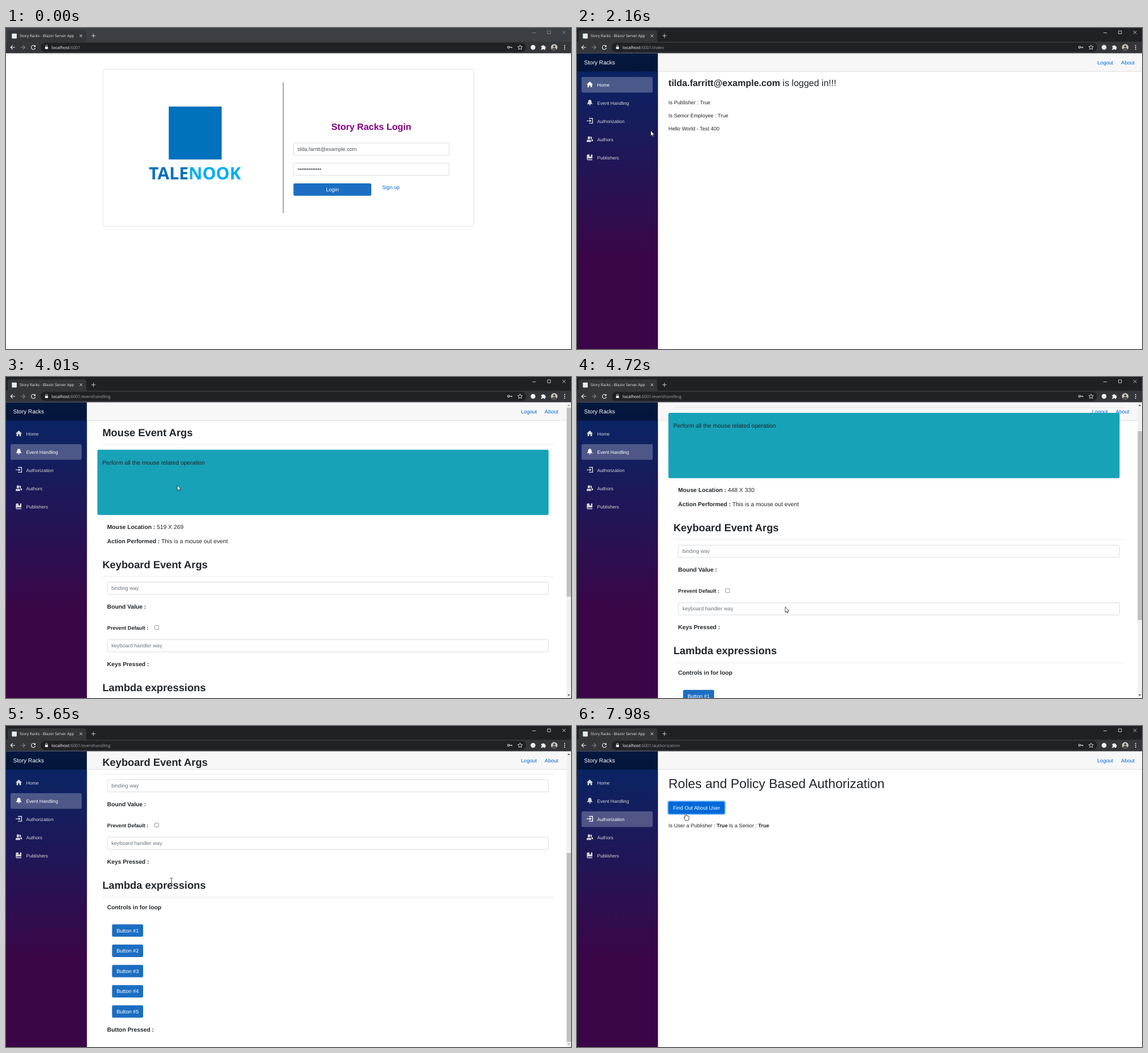
An HTML page for the animation above (8 s loop, 993x564 px).

```html
<!DOCTYPE html>
<html lang="en">
<head>
<meta charset="utf-8">
<title>Story Racks</title>
<style>
html, body { margin: 0; width: 100%; height: 100%; overflow: hidden; background: #fff; }
svg { display: block; width: 993px; height: 564px; }
text { font-family: "Liberation Sans", Arial, sans-serif; white-space: pre; text-rendering: geometricPrecision; }
.ui { font-family: "Open Sans", "Noto Sans", sans-serif; }
.b { font-weight: 700; }
</style>
</head>
<body>
<svg id="stage" viewBox="0 0 993 564" xmlns="http://www.w3.org/2000/svg"></svg>
<script>
const LOOP = 8000;
const INK = '#212529', LINK = '#0366d6', BLUE = '#1b6ec2', HOVER = '#0069d9';
const BRAND = 'Story Racks', USER = 'tilda.farritt@example.com';
const $ = id => document.getElementById(id);

const text = (x, y, size, str, fill = INK, extra = '') =>
  `<text x="${x}" y="${y}" font-size="${size}" fill="${fill}" ${extra}>${str}</text>`;
const bold = (x, y, size, str) => text(x, y, size, str, INK, 'class="b"');
const ui = (x, y, size, str, fill, extra = '') => text(x, y, size, str, fill, `class="ui" ${extra}`);
const mid = (x, y, size, str, fill, extra = '') => text(x, y, size, str, fill, `text-anchor="middle" ${extra}`);
const rect = (x, y, w, h, fill, r = 0, extra = '') =>
  `<rect x="${x}" y="${y}" width="${w}" height="${h}" rx="${r}" fill="${fill}" ${extra}/>`;
const path = (d, fill, extra = '') => `<path d="${d}" fill="${fill}" ${extra}/>`;
const line = (d, color, w = 1, extra = '') => path(d, 'none', `stroke="${color}" stroke-width="${w}" ${extra}`);
const dot = (x, y, r, fill, extra = '') => `<circle cx="${x}" cy="${y}" r="${r}" fill="${fill}" ${extra}/>`;
const input = (x, y, w) => rect(x, y, w, 21.4, '#fff', 2.3, 'stroke="#ced4da" stroke-width=".8"');
const button = (x, y, w, label, id = '') =>
  rect(x, y, w, 21.8, BLUE, 2.3, id && `id="${id}" stroke="#268fff" stroke-opacity=".5" stroke-width="0" paint-order="stroke"`) +
  mid(x + w / 2, y + 14.1, 9.14, label, '#fff');

function chrome() {
  const W = '#f1f3f4', G = '#d5d7da';
  return rect(0, 0, 993, 24, '#202124', 0, 'id="strip"') +
    path('M0 24Q3 24 3 21V8Q3 4 7 4H137Q141 4 141 8V21Q141 24 144 24Z', '#35363a') +
    rect(10.3, 9.8, 8.6, 8.6, '#e4edf2', .8) +
    ui(24, 16.3, 6.62, BRAND + ' - Blazor Server App', '#e8eaed') +
    line('M129.5 11.5l4.4 4.4m0-4.4l-4.4 4.4', W, .9) +
    line('M150 13.7h7.4m-3.7-3.7v7.4', G, .9) +
    `<g id="winBtns">${line('M925 8.5h6.4M951.8 5h5.2v5.2h-5.2zM977.8 4.9l5.6 5.6m0-5.6l-5.6 5.6', '#e8eaed', .8)}</g>` +
    rect(0, 24, 993, 20.4, '#35363a') +
    line('M15.7 34H8.3m3.5-3.6L8.2 34l3.6 3.6', W, 1.1) +
    line('M25.8 34h7.4m-3.5-3.6l3.6 3.6-3.6 3.6', '#84878b', 1.1) +
    line('M50.6 31.6a3.6 3.6 0 1 0 .9 3.4', W, 1.1) + path('M51.9 29.7v3.6h-3.6z', W) +
    rect(61, 26, 853, 16, '#202124', 8) +
    rect(68.7, 33, 5, 4, W, .6) + line('M69.8 33v-1.4a1.4 1.4 0 0 1 2.8 0V33', W, .8) +
    `<text x="80" y="36.7" font-size="7.55" class="ui" fill="#9aa0a6"><tspan fill="#fff">localhost</tspan>:6001/<tspan id="route"></tspan></text>` +
    line('M885 33.7h4.2v1.8m-1.7-1.8v1.3', G, 1) + dot(883.2, 33.7, 1.7, 'none', `stroke="${G}" stroke-width="1.1"`) +
    line('M903.5 29.8l1.2 2.8 3 .2-2.3 2 .7 3-2.6-1.6-2.6 1.6.7-3-2.3-2 3-.2z', W, .8) +
    dot(926.3, 34, 4.2, W) +
    path('M940.5 31.5h2.2a1.3 1.3 0 1 1 2.6 0h2.2v2.2a1.3 1.3 0 1 1 0 2.6v2h-2.2a1.3 1.3 0 0 0-2.6 0h-2.2v-2.1a1.3 1.3 0 0 0 0-2.6z', W) +
    dot(963.5, 34, 5.8, '#c9c4bd') + dot(963.5, 32.4, 2, '#4b4744') + path('M959.5 38.2q0-3.2 4-3.2t4 3.2q-4 2.6-8 0z', '#4b4744') +
    [30.8, 34, 37.2].map(y => dot(981.8, y, .95, W)).join('');
}

const navIcons = [
  path('M5.5 0L0 5.2h1.6V10h2.7V6.8h2.4V10h2.7V5.2H11z', 'currentColor'),
  path('M5.5 0C3.4 0 2.6 1.8 2.5 3.6 2.4 5.6 1.4 6.6.2 7.6h10.6C9.6 6.6 8.6 5.6 8.5 3.6 8.4 1.8 7.6 0 5.5 0zM4 8.5a1.5 1.5 0 0 0 3 0z', 'currentColor'),
  line('M4 .7h6.3v8.6H4', 'currentColor', 1.4) + path('M5.2 2.4L8.4 5 5.2 7.6V5.7H0V4.3h5.2z', 'currentColor'),
  `<g fill="currentColor"><ellipse cx="3.9" cy="2.9" rx="2.1" ry="2.7"/><path d="M0 10V7.8Q0 6.4 1.8 6q2.1 1.2 4.2 0 1.8.4 1.8 1.8V10zM6.4.8a2 2.4 0 1 1 .5 4.5Q7.3 3 6.4.8zM8.7 8.8V7.4q0-.8-.8-1.5l1.9-.5q1.4.4 1.4 1.6v1.8z"/></g>`,
  path('M1.4 0H5v4l1.3-1.2L7.6 4V0H10v7H2q-.8.1-.8.8t.8.7h8V10H1.6Q.3 9.8.3 8.4v-7Q.3.2 1.4 0z', 'currentColor')
];
const navLabels = ['Home', 'Event Handling', 'Authorization', 'Authors', 'Publishers'];
const navY = i => 86 + i * 32.05;

function sidebar() {
  return rect(0, 44.4, 142.3, 520, 'url(#night)') + rect(0, 44.4, 142.3, 32.2, '#000', 0, 'opacity=".4"') +
    text(12.5, 64.2, 10.1, BRAND, '#fff') +
    navLabels.map((s, i) => rect(8, navY(i), 125, 27.4, '#fff', 2.3, `id="nav${i}"`) +
      `<g id="item${i}"><g transform="translate(17 ${navY(i) + 8})">${navIcons[i]}</g>` +
      text(35.5, navY(i) + 16.9, 8.23, s, 'currentColor') + '</g>').join('');
}

function topbar() {
  return rect(142.3, 44.4, 851, 32.2, '#f7f7f7') + line('M142.3 76.3H993', '#d6d5d5', .7) +
    `<g id="links">${text(914.5, 63.7, 9.14, 'Logout', LINK)}${text(956.3, 63.7, 9.14, 'About', LINK)}</g>`;
}

function login() {
  return rect(170.5, 72.5, 652, 276, '#fff', 2.3, 'stroke="#dfdfdf" stroke-width=".8"') +
    line('M487.2 96v229', '#555', 1) +
    rect(286, 138, 93, 93, '#0071bc') +
    `<text x="332" y="265.7" font-size="30" text-anchor="middle" class="ui b" fill="#0071bc">TALE<tspan fill="#00aeef">NOOK</tspan></text>` +
    mid(642, 179.4, 16, BRAND + ' Login', '#800080', 'class="b"') +
    input(505.4, 202.2, 273.4) + text(512.6, 215.7, 9.14, USER, '#495057') +
    input(505.4, 237.4, 273.4) + text(512.6, 250.8, 9.14, '•'.repeat(13), '#495057') +
    button(505.2, 272.9, 136.8, 'Login', 'loginBtn') + text(661, 282.7, 9.14, 'Sign up', LINK);
}

function home() {
  return `<text x="160.8" y="102.3" font-size="16" fill="${INK}"><tspan class="b">${USER}</tspan> is logged in!!!</text>` +
    ['Is Publisher : True', 'Is Senior Employee : True', 'Hello World - Test 400']
      .map((s, i) => text(160.8, 134.1 + i * 22.9, 9.14, s)).join('');
}

function events() {
  const head = (y, s) => bold(169.4, y, 18.28, s) + line(`M169.4 ${y + 14.5}H962`, '#000', .7, 'stroke-opacity=".12"');
  const field = (y, s) => input(178, y, 775.4) + text(185.2, y + 13.7, 9.14, s, '#6c757d');
  const pair = (y, s, id) => `<text x="177.8" y="${y}" font-size="10.28" fill="${INK}"><tspan class="b">${s} :</tspan> <tspan id="${id}"></tspan></text>`;
  return head(104, 'Mouse Event Args') +
    rect(160.6, 127.8, 793, 114.6, '#17a2b8', 2.3) +
    text(169.2, 154, 10.28, 'Perform all the mouse related operation') +
    pair(267, 'Mouse Location', 'spot') + pair(291.7, 'Action Performed', 'action') +
    head(336, 'Keyboard Event Args') + field(360.3, 'binding way') +
    bold(177.8, 406.6, 10.28, 'Bound Value :') + bold(177.8, 443.6, 9.14, 'Prevent Default :') +
    rect(261.4, 436.6, 6.8, 6.8, '#fff', 1, 'stroke="#767676" stroke-width=".8"') +
    field(461.4, 'keyboard handler way') + bold(177.8, 508, 10.28, 'Keys Pressed :') +
    head(552.2, 'Lambda expressions') + bold(177.8, 587.5, 10.28, 'Controls in for loop') +
    [1, 2, 3, 4, 5].map(n => button(186.4, 579 + n * 35.55, 54.6, 'Button #' + n)).join('') +
    bold(177.8, 803.2, 10.28, 'Button Pressed :');
}

function auth() {
  return text(160.8, 108.6, 22.85, 'Roles and Policy Based Authorization') +
    button(160.5, 132.7, 99, 'Find Out About User', 'findBtn') +
    `<text x="160.8" y="178.2" font-size="9.14" fill="${INK}">Is User a Publisher : <tspan class="b" id="pub"></tspan> Is a Senior : <tspan class="b" id="senior"></tspan></text>`;
}

$('stage').innerHTML =
  `<defs><linearGradient id="night" x1="0" y1="0" x2="0" y2="1"><stop offset="0" stop-color="#052767"/><stop offset=".7" stop-color="#3a0647"/></linearGradient>
  <clipPath id="view"><rect x="142" y="44.4" width="843" height="520"/></clipPath></defs>` +
  rect(0, 0, 993, 564, '#fff') +
  `<g id="login">${login()}</g><g id="app">${sidebar()}${topbar()}</g><g id="home">${home()}</g>
  <g id="events"><g clip-path="url(#view)"><g id="scroll">${events()}</g></g>
  ${rect(985, 44.4, 8, 520, '#f1f1f1')}${rect(985.4, 54, 7.6, 332, '#c1c1c1', 0, 'id="thumb"')}
  ${path('M986.8 51l2.3-2.8 2.3 2.8z', '#505050', 'id="up"')}${path('M986.8 557.8l2.3 2.8 2.3-2.8z', '#505050', 'id="down"')}</g>
  <g id="auth">${auth()}</g>` + chrome() +
  `<g id="status">${rect(-3, 553, 120, 14, '#35363a', 2)}${ui(1.7, 561.2, 6.5, '', '#bdc1c6', 'id="url"')}</g>
  <g id="cursor" stroke="#111" stroke-width=".75" stroke-linejoin="round">
  ${path('M0 0V9.6L2.2 7.6 3.6 10.9 5.2 10.2 3.8 7H6.8Z', '#fff', 'id="arrow"')}
  ${path('M-1.1 .9C-1.1-.3 .9-.3 .9 .9V4.6C1.1 3.9 2.7 4 2.7 5.1 3 4.5 4.3 4.6 4.3 5.6 4.7 5.1 5.9 5.3 5.9 6.3V9C5.9 10.6 5 11.4 4.8 13H-.6C-.9 11.2-2.9 9.4-3.2 7.6-3.3 6.6-2 6.3-1.1 7.6Z', '#fff', 'id="hand"')}
  ${path('M-2.4-4.7Q-.3-4.7 0-4 .3-4.7 2.4-4.7M0-4V4M-2.4 4.7Q-.3 4.7 0 4 .3 4.7 2.4 4.7', 'none', 'id="beam"')}</g>`;

// Bursts of screen updates: first, last, count
const bursts = [[130, 770, 9], [1070, 1160, 2], [1620, 2390, 11], [2470, 2470, 1], [2620, 2780, 3],
  [2940, 3720, 11], [3770, 4550, 11], [4630, 5190, 8], [5410, 6110, 10], [6260, 6340, 2],
  [6490, 7120, 9], [7500, 7730, 4], [7980, 7980, 1]];
// Pointer path: time, x, y
const moves = [[130, 962, 543], [290, 880, 470], [530, 690, 335], [690, 622, 296], [770, 613, 292],
  [1620, 604, 290], [1850, 400, 245], [2080, 170, 195], [2240, 88, 165], [2390, 80, 148], [2470, 80, 146.5],
  [2620, 80, 143], [2780, 80, 138.5], [3330, 80, 138.5], [3720, 140, 146], [3770, 160, 150], [4004, 301, 190],
  [4160, 264, 226], [4238, 256, 246], [4394, 310, 340], [4550, 366, 404], [5360, 366, 404],
  [5643, 291, 272], [5880, 130, 185], [6110, 79, 162], [6420, 79, 162], [6800, 135, 160], [7120, 200, 149],
  [7970, 200, 149], [7980, 191, 153]];
const scrolls = [[4590, 0], [4870, 151], [5030, 220], [5190, 266]];

function snap(t) {
  let s = 0;
  for (const [a, b, n] of bursts) {
    if (t < a) break;
    const step = n > 1 ? (b - a) / (n - 1) : 1;
    s = a + step * Math.min(n - 1, Math.floor((t - a) / step + .01));
  }
  return s;
}

function along(keys, t, col = 1) {
  if (t <= keys[0][0]) return keys[0][col];
  for (let i = 1; i < keys.length; i++) {
    const p = keys[i - 1], q = keys[i];
    if (t < q[0]) return p[col] + (q[col] - p[col]) * (t - p[0]) / (q[0] - p[0]);
  }
  return keys[keys.length - 1][col];
}

const set = (id, name, v) => $(id).setAttribute(name, v);
const show = (id, on) => set(id, 'display', on ? 'inline' : 'none');
const write = (id, s) => { if ($(id).textContent !== s) $(id).textContent = s; };
const inside = (x, y, l, t, w, h) => x >= l && x < l + w && y >= t && y < t + h;

function draw(now) {
  const t = snap(now % LOOP);
  const page = t < 1150 ? 'login' : t < 3010 ? 'home' : t < 6330 ? 'events' : 'auth';
  const x = along(moves, t), y = along(moves, t, 2);
  for (const p of ['login', 'home', 'events', 'auth']) show(p, p === page);
  show('app', page !== 'login');
  write('route', { login: '', home: 'index', events: 'eventhandling', auth: 'authorization' }[page]);
  // the address has no trailing slash on the first page
  const slash = $('route').previousSibling;
  slash.data = page === 'login' ? ':6001' : ':6001/';

  const focused = t >= 1060;
  set('strip', 'fill', focused ? '#202124' : '#3c3f43');
  set('winBtns', 'opacity', focused ? 1 : .5);

  const active = ['home', 'events', 'auth'].indexOf(page);
  let over = false;
  navLabels.forEach((_, i) => {
    const hot = page !== 'login' && inside(x, y, 8, navY(i), 125, 27.4);
    over = over || hot;
    set('nav' + i, 'opacity', i === active ? .25 : hot ? .1 : 0);
    set('item' + i, 'color', i === active || hot ? '#fff' : '#d7d7d7');
  });

  const onLogin = page === 'login' && inside(x, y, 505, 273, 137, 22);
  const onFind = page === 'auth' && inside(x, y, 160, 132, 100, 23);
  set('loginBtn', 'fill', onLogin ? HOVER : BLUE);
  set('loginBtn', 'stroke-width', focused ? 3.6 : 0);
  set('findBtn', 'fill', onFind ? HOVER : BLUE);
  set('findBtn', 'stroke-width', 3.6 * Math.max(0, Math.min(1, (t - 7450) / 150)));

  const known = t > 7570 ? 'True' : 'False';
  write('pub', known);
  write('senior', known);
  const left = t > 4230;
  write('spot', left ? '448 X 330' : t > 3900 ? '519 X 269' : '');
  write('action', t > 3900 ? 'This is a mouse out event' : '');

  const s = along(scrolls, t);
  set('scroll', 'transform', `translate(0 ${-s})`);
  set('thumb', 'y', 54 + s * 169 / 266);
  set('up', 'fill', s > 0 ? '#505050' : '#a3a3a3');
  set('down', 'fill', s < 266 ? '#505050' : '#a3a3a3');
  set('links', 'transform', `translate(${page === 'events' ? -9.5 : 0} 0)`);

  const hint = t >= 2230 && t < 2470 || t >= 2940 && t < 3840 || t >= 6260 && t < 6800;
  show('status', hint);
  set('status', 'opacity', t >= 2930 && t < 3000 ? .4 : 1);
  write('url', 'https://localhost:6001/' + (t >= 2900 && t < 4000 ? 'eventhandling' : 'authorization'));

  const kind = over || onLogin || onFind ? 'hand' : t > 5600 && t < 5700 ? 'beam' : 'arrow';
  for (const k of ['arrow', 'hand', 'beam']) show(k, k === kind);
  show('cursor', t >= 130);
  set('cursor', 'transform', `translate(${x} ${y})`);
}

const start = performance.now();
function tick() {
  draw(performance.now() - start);
  requestAnimationFrame(tick);
}
tick();
</script>
</body>
</html>
```
